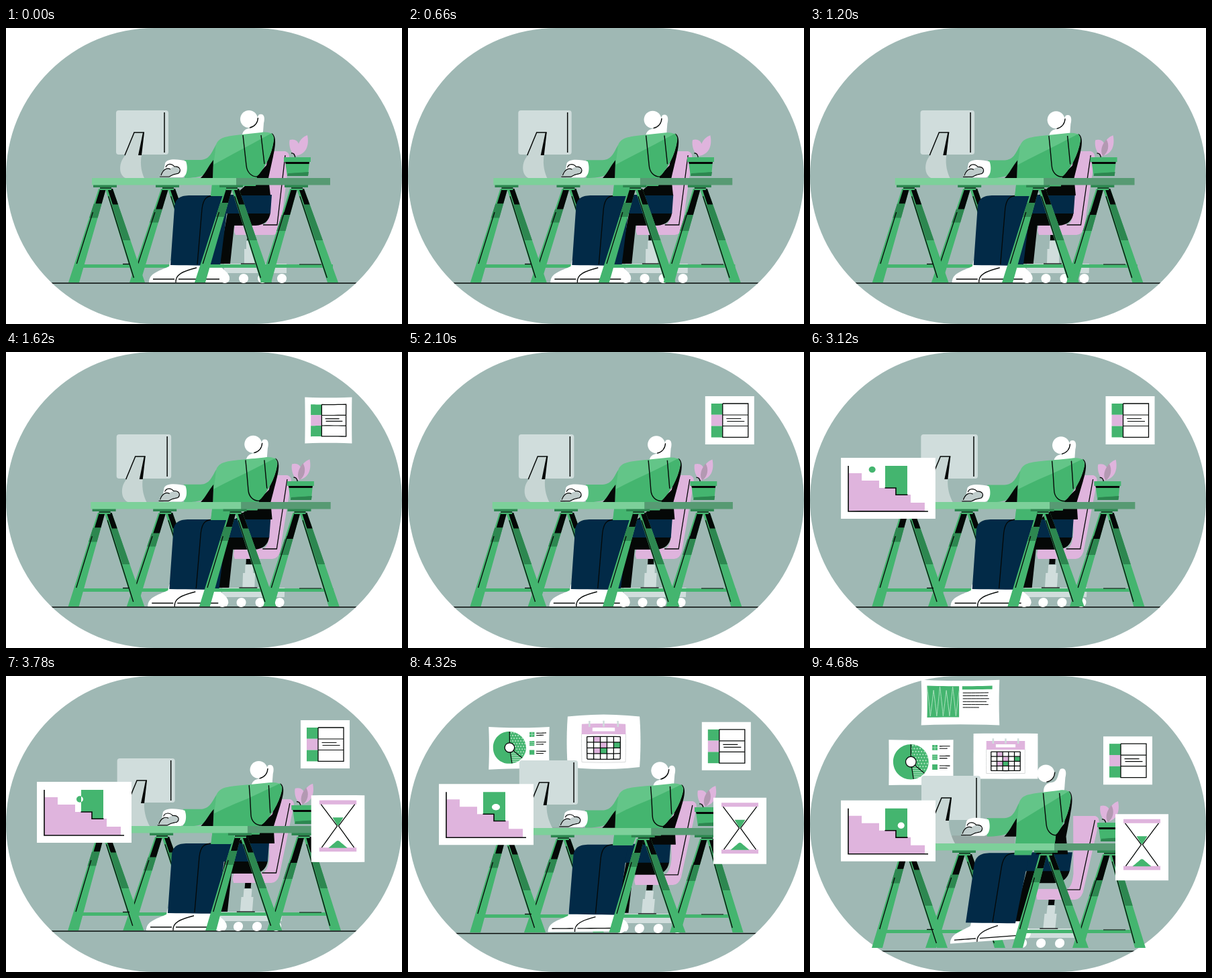
Write an HTML page with a canvas that moves like this. It is 590 px wide and 442 px high and loops after 4.74 s.

```html
<!DOCTYPE html>
<html lang="en">
<head>
<meta charset="utf-8">
<title>Desk work</title>
<style>
html, body { margin: 0; width: 100%; height: 100%; overflow: hidden; background: #fff; }
canvas { display: block; }
</style>
</head>
<body>
<canvas id="stage" width="590" height="442"></canvas>
<script>
const ctx = document.getElementById('stage').getContext('2d');
const LOOP = 4740, STEP = 60;
const BG = '#9fb8b4', GREEN = '#44b56f', LIGHT = '#63c588', SLEEVE = '#54bd7c', DARK = '#2d8750',
  NAVY = '#022a47', PINK = '#dfb4dd', GREY = '#d0dddc', INK = '#050807', WHITE = '#fff';

let time = 0, drift = 0, pan = 0;

const clamp = v => Math.max(0, Math.min(1, v));
const move = (from, to) => from + (to - from) * drift;
const smooth = v => { v = clamp(v); return v * v * (3 - 2 * v); };
const same = (x, y) => [x, y];

// Traces an absolute M/L/Q/C/Z path with every point sent through a warp.
function trace(d, warp = same) {
  const tokens = d.match(/[A-Z]|-?[\d.]+/g);
  let i = 0, cmd = '', x = 0, y = 0;
  const point = () => { x = +tokens[i++]; y = +tokens[i++]; return warp(x, y); };
  ctx.beginPath();
  while (i < tokens.length) {
    if (/[A-Z]/.test(tokens[i])) cmd = tokens[i++];
    if (cmd === 'Z') ctx.closePath();
    else if (cmd === 'M') ctx.moveTo(...point());
    else if (cmd === 'Q') ctx.quadraticCurveTo(...point(), ...point());
    else if (cmd === 'C') ctx.bezierCurveTo(...point(), ...point(), ...point());
    else {
      const ax = x, ay = y;
      point();
      for (let k = 1; k <= 6; k++) ctx.lineTo(...warp(ax + (x - ax) * k / 6, ay + (y - ay) * k / 6));
    }
  }
}

function fill(d, color, warp) {
  trace(d, warp);
  ctx.fillStyle = color;
  ctx.fill();
}

function line(d, warp, width = 1.5, color = INK) {
  trace(d, warp);
  ctx.strokeStyle = color;
  ctx.lineWidth = width;
  ctx.stroke();
}

const box = (x, y, w, h) => `M${x} ${y} L${x + w} ${y} L${x + w} ${y + h} L${x} ${y + h} L${x} ${y}`;

function ring(cx, cy, rx, ry = rx) {
  const a = rx * .552, b = ry * .552;
  return `M${cx + rx} ${cy} C${cx + rx} ${cy + b} ${cx + a} ${cy + ry} ${cx} ${cy + ry}` +
    `C${cx - a} ${cy + ry} ${cx - rx} ${cy + b} ${cx - rx} ${cy}` +
    `C${cx - rx} ${cy - b} ${cx - a} ${cy - ry} ${cx} ${cy - ry}` +
    `C${cx + a} ${cy - ry} ${cx + rx} ${cy - b} ${cx + rx} ${cy} Z`;
}

function sector(cx, cy, r, from, to) {
  let d = `M${cx} ${cy}`;
  for (let k = 0; k <= 16; k++) {
    const a = (from + (to - from) * k / 16) * Math.PI / 180;
    d += ` L${(cx + r * Math.cos(a)).toFixed(2)} ${(cy + r * Math.sin(a)).toFixed(2)}`;
  }
  return d + ' Z';
}

// Springy pop with bulging edges; content uses coordinates around the card's centre.
function card(start, cx, cy, hw, hh, content) {
  const age = time - start;
  if (age <= 0) return;
  const s = 1 - Math.exp(-age / 124) * Math.cos(Math.PI * age / 200);
  const warp = (x, y) => {
    const u = x / hw, v = y / hh;
    return [cx + x * s * (1 + .2 * (s - 1) * (1 - v * v)),
            cy + y * s * (1 + .6 * (s - 1) * (1 - u * u))];
  };
  fill(box(-hw, -hh, hw * 2, hh * 2), WHITE, warp);
  content(warp);
}

function checklist(w) {
  [GREEN, PINK, GREEN].forEach((c, i) => fill(box(-27.5, -25 + i * 16.8, 17, 16.8), c, w));
  line(box(-10.5, -25, 38, 50.4), w, 1.3);
  line('M-10.5 -8 L27.5 -8 M-10.5 8.5 L27.5 8.5 M-5 -2.5 L17 -2.5 M-4 1.5 L22 1.5', w, 1.2);
}

// Ball position by time: ms, x, y.
const ROLL = [[2320, -45, -37], [2520, -39.7, -35.7], [3780, -6.5, -19.5], [4320, 14.5, -11], [4740, 20, -7.5]];

function ballAt(t) {
  const n = ROLL.findIndex(p => p[0] > t), b = ROLL[n < 0 ? ROLL.length - 1 : n], a = ROLL[Math.max(0, n - 1)];
  const k = b === a ? 0 : (t - a[0]) / (b[0] - a[0]);
  return [a[1] + (b[1] - a[1]) * k, a[2] + (b[2] - a[2]) * k];
}

function stairs(w) {
  const door = 'M-4.5 -33.5 L28.5 -33.5 L28.5 9.5 L11.5 9.5 L11.5 -.5 L-4.5 -.5 Z';
  fill('M-59.5 -22.5 L-39.5 -22.5 L-39.5 -11.5 L-13.5 -11.5 L-13.5 -.5 L11.5 -.5 L11.5 9.5 ' +
    'L33.5 9.5 L33.5 21.5 L54.5 21.5 L54.5 34.5 L-59.5 34.5 Z', PINK, w);
  fill(door, GREEN, w);
  line('M-5 -.5 L11.5 -.5 L11.5 9.8 L29 9.8', w, 1.6);
  line('M-59.5 -33.5 L-59.5 34.5 L59.5 34.5', w, 1.6);
  const [x, y] = ballAt(time), ball = ring(x, y, time > 4200 && time < 4400 ? 6 : 5, 4.7);
  fill(ball, GREEN, w);
  ctx.save();
  trace(door, w);
  ctx.clip();
  fill(ball, WHITE, w);
  ctx.restore();
}

function hourglass(w) {
  fill(box(-27.5, -42, 55, 6), PINK, w);
  fill(box(-27.5, 28, 55, 6), PINK, w);
  fill('M-8 -16.5 L8 -16.5 L1 -5 L-1 -5 Z', GREEN, w);
  fill('M-14 28.5 L-4 20 Q0 15 4 20 L14 28.5 Z', GREEN, w);
  line('M-25 -36 L-1 -4 L-24 28 M25 -36 L1 -4 L24 28', w, 1.3);
}

function calendar(w) {
  fill(box(-28.5, -22.5, 57, 13), PINK, w);
  fill(box(-14.5, -17.5, 29, 4.5), WHITE, w);
  line('M-28.5 -10 L-28.5 25.5 L28.5 25.5 L28.5 -10', w, 1, '#d8dada');
  for (const x of [-18.5, 0, 18.5]) line(`M${x} -26 L${x} -18.5`, w, 2.6, GREY);
  const cells = [[1, 0, PINK], [4, 1, GREEN], [2, 1, PINK], [1, 2, PINK], [2, 2, GREEN]];
  for (const [c, r, color] of cells) fill(box(-21.5 + c * 8.6, -6.5 + r * 7, 8.6, 7), color, w);
  for (let i = 0; i <= 5; i++) line(`M${-21.5 + i * 8.6} -6.5 L${-21.5 + i * 8.6} 21.5`, w, 1.3);
  for (let i = 0; i <= 4; i++) line(`M-21.5 ${-6.5 + i * 7} L21.5 ${-6.5 + i * 7}`, w, 1.3);
}

function pie(w) {
  const cx = -15.5, cy = -1, light = '#a9dfbc';
  fill(ring(cx, cy, 27), GREEN, w);
  ctx.save();
  trace(sector(cx, cy, 27, -90, 40), w);
  ctx.clip();
  for (let r = 0; r < 10; r++)
    for (let c = 0; c < 7; c++) fill(ring(cx + 3 + c * 4.4 - r % 2 * 2.2, cy - 25 + r * 4.6, 1.2), light, w);
  ctx.restore();
  ctx.save();
  trace(sector(cx, cy, 27, 40, 82), w);
  ctx.clip();
  for (let y = 4; y < 28; y += 3.2) line(`M${cx} ${cy + y} L${cx + 27} ${cy + y}`, w, 1.3, light);
  ctx.restore();
  line(`M${cx} ${cy} L${cx} ${cy - 27} M${cx} ${cy} L${cx + 20.5} ${cy + 17.5} M${cx} ${cy} L${cx + 4} ${cy + 26.5}`, w, 1.2);
  fill(ring(cx, cy, 8), WHITE, w);
  line(ring(cx, cy, 8), w, 1.3);
  for (let i = 0; i < 3; i++) {
    const y = -27 + i * 15;
    fill(box(17, y, 8, 8), GREEN, w);
    if (i === 0) line(`M21 ${y} L21 ${y + 8} M17 ${y + 4} L25 ${y + 4}`, w, 1, light);
    if (i === 1) line(`M17 ${y + 2.5} L25 ${y + 2.5} M17 ${y + 5.5} L25 ${y + 5.5}`, w, 1, light);
    line(`M28 ${y + 2} L44 ${y + 2} M28 ${y + 5.5} L40 ${y + 5.5}`, w, 1.1);
  }
}

function article(w) {
  fill(box(-53, -27, 51, 51), GREEN, w);
  let d = 'M-53 -25';
  for (let i = 1; i <= 10; i++) d += ` L${-53 + i * 5.1} ${i % 2 ? 22 : -26 + i % 4 * 3}`;
  line(d, w, 1, '#a9dfbc');
  fill(box(3, -27, 48, 5.5), GREEN, w);
  for (let i = 0; i < 6; i++) line(`M4 ${-16 + i * 4.8} L${[45, 44, 46, 42, 45, 30][i]} ${-16 + i * 4.8}`, w, 1);
}

const desk = (x, y) => [x, y + 29 * pan];

function monitor() {
  const l = move(164, 166), r = move(242, 254), n = move(0, 5), y = 123;
  fill(`M${l + 4} ${y} L${r - 4} ${y} Q${r} ${y} ${r} ${y + 4} L${r} 185 Q${r} 189 ${r - 4} 189 ` +
    `L${l + 4} 189 Q${l} 189 ${l} 185 L${l} ${y + 4} Q${l} ${y} ${l + 4} ${y} Z`, GREY, desk);
  line(`M${r - 6} 126 L${r - 6} 186`, desk);
  const stand = (x, v) => desk(x + n + drift * 5 * clamp((v - 190) / 30), v);
  fill('M191 156 L206 156 L202 190 C199 205 203 218 206 224 L178 224 C167 219 168 200 178 190 Z', '#c8d6d4', stand);
  fill('M204 156 L206 156 L202 190 L197 190 Z', INK, stand);
  line('M177 190 L191 156 L206 156', stand);
}

function chair() {
  const w = (x, y) => [x + drift * (9 - .1 * (y - 185)), y + 28 * pan];
  fill('M383 184 L416 184 Q423 186 422 195 L409 298 Q406 309 398 309 L342 309 Q338 302 342 293 L385 293 Q392 290 392 270 Z', PINK, w);
  line('M383 294 L404 294 L416 190', w, 1.3);
  fill(box(359, 309, 9, 8), INK, w);
  fill('M358 318 L370 318 L370 330 L373 330 L373 352 L355 352 L355 330 L358 330 Z', GREY, w);
  fill(box(325, 352, 93, 14), GREY, w);
  line('M350 352 L377 352', w, 1.3);
  for (const x of [326, 354, 382, 411]) fill(ring(x, 374, 7), WHITE, w);
}

function lowerBody() {
  const pants = (x, y) => [x - 5 * drift - 9 * pan * clamp((y - 250) / 105), y + 16 * pan];
  const shoe = (x, y) => [x - 5 * drift + pan, y + pan * (22 - .08 * (x - 213))];
  fill('M213 380 C213 366 228 363 243 356 L245 347 L310 347 L330 366 Q336 374 330 380 Z', WHITE, shoe);
  line('M253 380 C252 368 264 363 284 358 M219 375 L251 375 M257 375 L318 375', shoe, 1.3);
  fill('M330 276 L394 276 C392 288 385 294 372 295 L340 295 L334 352 L316 352 Z', INK, pants);
  fill('M325 249 L396 249 L394 277 L325 277 Z', NAVY, pants);
  fill('M251 268 C252 254 260 250 275 250 L332 250 L319 355 L245 354 Z', NAVY, pants);
  line('M313 250 C299 250 294 254 292 270 L285 353', pants, 1.3);
}

function body(x, y) {
  const rise = (250 - y) / 93;
  const squeeze = x > 300 ? (1 + .08 * drift) * (1 - .19 * pan) : 1;
  const shift = (8 * drift - 9 * pan) * rise * clamp((x - 330) / 25) - 4 * drift * clamp((300 - x) / 60);
  return [300 + (x - 300) * squeeze + shift, y + 4 * drift * rise + pan * (18 - 6 * rise)];
}

function upperBody() {
  const head = (x, y) => [x + 18 * drift - 32 * pan, y + 5 * drift + 5 * pan];
  const neck = (x, y) => [x + 17 * drift - 23 * pan, y + 5 * drift + 5 * pan];
  fill('M352 168 C350 152 358 150 366 149 C375 146 373 130 378 129 C385 127 386 135 384 142 L382 168 Z', WHITE, neck);
  fill(ring(362, 136, 13), WHITE, head);
  line('M363 149 C371 147 375 142 375.5 134', head, 1.3);

  fill('M396 157 C404 162 401 178 398 192 L391 224 L394 250 L340 250 L372 222 L388 205 Z', INK, body);
  fill('M309 197 L313 174 C318 163 326 162 352 159 L380 156 C396 154 400 160 399 168 ' +
    'C396 190 386 208 374 222 L372 236 L338 236 L333 251 L305 251 L308 224 Z', LIGHT, body);
  fill('M399 166 C396 190 386 208 374 222 L372 236 L338 236 L333 251 L305 251 L308 224 L309 204 L396 157 Z', GREEN, body);
  fill('M266 197 L290 197 C304 196 306 186 313 174 L309 206 C302 218 292 224 266 224 Z', SLEEVE, body);
  fill('M309 197 C301 207 298 216 290 224 L308 224 Z', INK, body);
  line('M353 160 L358 205 C359 216 366 222 374 222 L385 214 M380 160 L385 203', body, 1.4);
}

function hand() {
  fill('M268 199 C258 196 240 194 237 202 L235 214 L236 223 L262 223 C271 222 271 206 268 199 Z', WHITE, body);
  fill('M229 223 C231 213 237 208 245 210 C251 205 258 207 260 216 L249 219 L244 223 Z', '#bfcccb', body);
  line('M231 220 C234 211 240 208 245 211 M238 208 C240 202 247 202 251 207 C258 206 262 212 257 217 L249 219 L243 222 M229 222 L243 222', body, 1.2);
}

// One sloping trestle leg, shaded by height fractions.
function leg(top, foot, black, dark, right) {
  const at = (f, off) => `${top + (foot - top) * f + off * (11 + 5 * f)} ${240 + 140 * f}`;
  const band = (a, b, color, l = 0, r = 1) =>
    fill(`M${at(a, l)} L${at(a, r)} L${at(b, r)} L${at(b, l)} Z`, color, desk);
  band(0, 1, GREEN);
  band(0, black, INK, right ? .3 : .2);
  band(black, dark, DARK, right ? .2 : 0);
  if (right) line(`M${at(.08, .1)} L${at(.95, .1)}`, desk, 1.3);
  else line(`M${at(.25, .22)} L${at(.8, .22)}`, desk, 1.3);
}

function trestle(apex, leftFoot, rightFoot, black, dark) {
  leg(apex + 1, rightFoot, .17, .55, true);
  leg(apex - 9, leftFoot, black, dark, false);
  fill(box(apex - 17, 234, 35, 4), DARK, desk);
  fill(box(apex - 7, 238, 17, 4), GREEN, desk);
  line(`M${apex - 7} 239 L${apex + 10} 239`, desk, 1.2);
}

function deskTop() {
  const l = move(128, 123), mid = move(343, 364), r = move(483, 485);
  fill(box(l, 224, mid - l, 10.5), '#7dd09a', desk);
  fill(box(mid, 224, r - mid, 10.5), '#579a73', desk);
}

function plant() {
  const leaf = (x, y) => desk(x + 10 * drift, y + drift);
  const pot = (x, y) => desk(x + 14 * drift, y);
  fill('M449 160 C452 175 448 188 432 191 C420 184 422 166 423 167 C430 165 435 169 436 173 C438 167 443 162 449 160 Z', PINK, leaf);
  if (drift > .2) fill('M439 166 C444 174 442 186 434 191 C429 185 432 174 439 166 Z', '#b399b2', leaf);
  line('M425 187 Q430 186 431 194', leaf, 1.4);
  fill(box(414, 193, 40, 7), GREEN, pot);
  fill('M416 200 L452 200 L450 221 L419 221 Z', GREEN, pot);
  fill('M416 200 L452 200 L451.5 203 L417 203 Z', INK, pot);
  fill('M420 217 L451 215 L450 221 L419 221 Z', DARK, pot);
}

function render(t) {
  time = t;
  drift = t / 4680;
  pan = smooth((t - 4200) / 600);
  const back = 27 * pan, front = 31 * pan;

  ctx.fillStyle = WHITE;
  ctx.fillRect(0, 0, 590, 442);
  ctx.save();
  ctx.beginPath();
  ctx.roundRect(0, 0, 590, 442, 221);
  ctx.fillStyle = BG;
  ctx.fill();
  ctx.clip();
  line('M0 381 L590 381', (x, y) => [x, y + 33.5 * pan]);
  ctx.restore();

  card(1220, move(484, 473.5), 102 + back, 36.5, 36, checklist);
  card(4588, 224, 15.5 + back, 62, 36, article);
  card(4085, 291.5, 95.5 + back, 47.5, 33.5, calendar);
  card(4230, 165.5, 105 + back, 49, 34.5, pie);

  fill(`M200 224 L212 ${224 - 13 * pan} L305 ${224 - 13 * pan} L305 224 Z`, '#98a9a6', desk);
  monitor();
  chair();
  trestle(move(240, 229), move(184, 172), move(285, 275), .22, .36);
  fill(box(104, 353, 141, 5), GREEN, desk);
  lowerBody();
  trestle(move(147, 143), move(93, 92), move(191, 189), .16, .31);
  line('M174 352.5 L184 352.5', desk, 1.3);
  upperBody();
  fill(box(move(300, 315), 353, move(187, 175), 5), GREEN, desk);
  trestle(move(432, 445), move(379, 391), move(479, 484), .28, .45);
  trestle(move(335, 351), move(281, 301), move(380, 399), .15, .3);
  line('M437 353 L470 353', desk, 1.2);
  deskTop();
  hand();
  plant();

  card(2320, 116.5, 203.5 + front, 70.5, 45.5, stairs);
  card(3250, 494.5, 228 + front, 39.5, 49.5, hourglass);
}

const begin = performance.now();
function tick() {
  const t = (performance.now() - begin) % LOOP;
  render(Math.floor(t / STEP) * STEP);
  requestAnimationFrame(tick);
}
tick();
</script>
</body>
</html>
```
